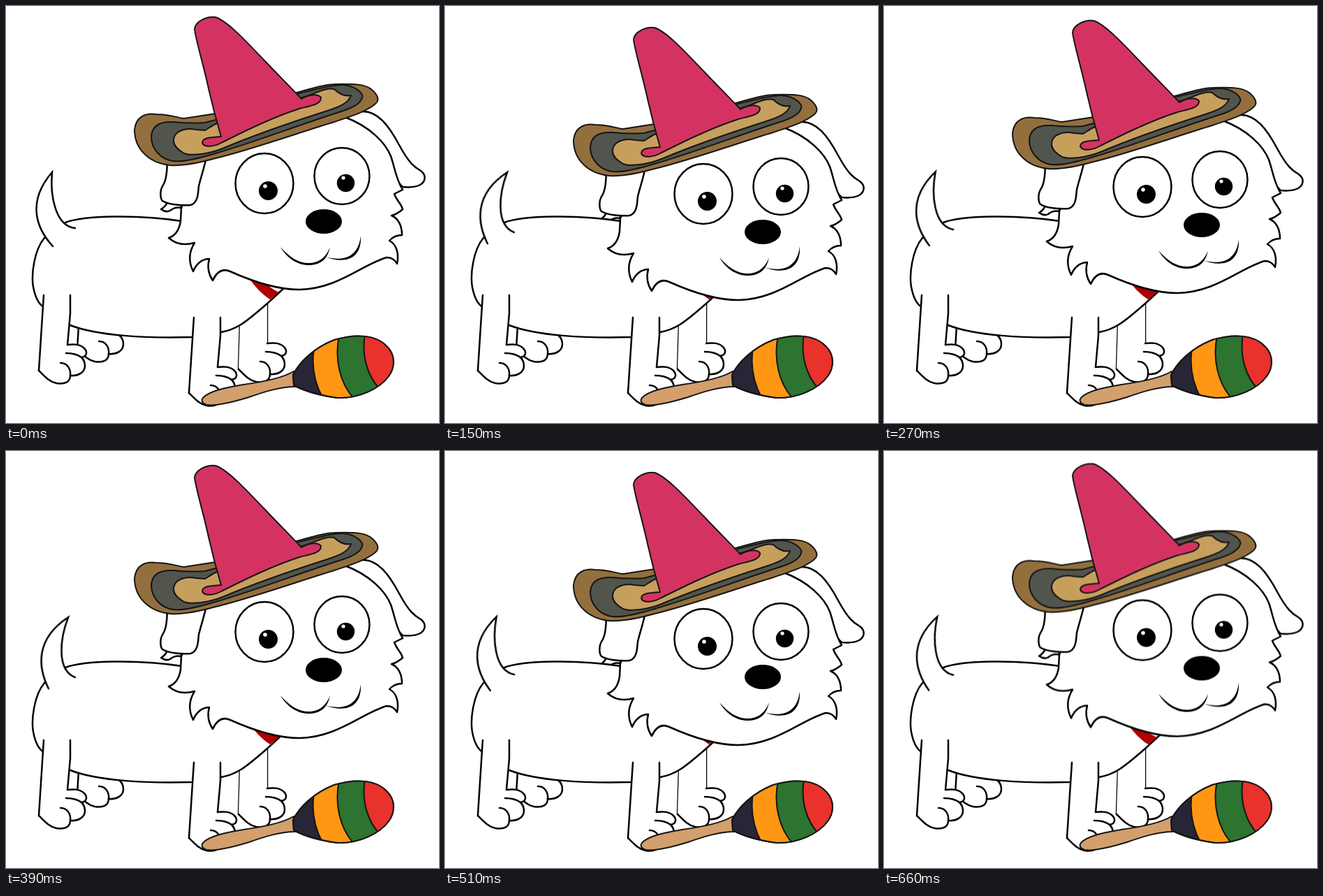
These frames come from a looping animation (620x597 px, 690 ms). An HTML page:

```html
<!DOCTYPE html>
<html lang="en">
<head>
<meta charset="utf-8">
<title>Festive dog</title>
<style>
  html, body { margin: 0; width: 100%; height: 100%; overflow: hidden; background: #fff; }
  svg { display: block; width: 620px; height: 597px; }
  .line { fill: none; stroke: #000; stroke-width: 2.5; stroke-linejoin: round; stroke-linecap: round; }
  .skin { fill: #fff; }
  .prop { stroke: #151515; stroke-width: 2; stroke-linejoin: round; }

  /* 23 poses of 30 ms each */
  .head { animation: bob 690ms infinite; }
  .tail { transform-origin: 77.5px 320.5px; animation: wag 690ms infinite; }

  @keyframes bob {
    0%       { transform: translateY(0);    animation-timing-function: steps(5); }
    21.7391% { transform: translateY(15px); animation-timing-function: steps(6); }
    47.826%  { transform: translateY(0);    animation-timing-function: steps(6); }
    73.913%  { transform: translateY(15px); animation-timing-function: steps(6); }
    100%     { transform: translateY(0); }
  }
  @keyframes wag {
    0%, 34.7826%, 69.5652%  { transform: rotate(0deg);    animation-timing-function: steps(4); }
    17.3913%, 52.1739%      { transform: rotate(21.3deg); animation-timing-function: steps(4); }
    86.9565%                { transform: rotate(21.3deg); animation-timing-function: steps(3); }
    100%                    { transform: rotate(0deg); }
  }
</style>
</head>
<body>
<svg viewBox="0 0 620 597">
  <defs>
    <path id="gourd" d="M411 528C420 510 440 490 470 478C500 469 530 470 546 488C558 500 557 518 548 530C535 548 505 562 475 561C445 557 425 550 412 543Z"/>
    <clipPath id="gourdClip"><use href="#gourd"/></clipPath>
    <g id="foot">
      <path class="skin" d="M47 522C55 530 62 538 72 540C85 542 92 538 92 529C103 530 113 525 113 515Q113 508 108 503C116 502 117 495 112 490C106 484 98 484 88 485"/>
      <path d="M108 503Q100 497 86 497M78 511C88 511 93 520 92 529"/>
    </g>
    <g id="leg">
      <path class="skin" stroke="none" d="M54 414L47 522L88 485L92 440V414Z"/>
      <use href="#foot"/>
      <path d="M54 414C52 445 49 490 47 522M92 414V440L88 485"/>
    </g>
  </defs>

  <!-- tuft behind the ear -->
  <g class="head">
    <path class="line skin" d="M232 279Q229 287 222 291Q229 296 235 293Q242 287 251 289V270Z"/>
  </g>

  <!-- far legs -->
  <g class="line">
    <use href="#foot" x="55" y="-31"/>
    <path d="M104 458L102 491"/>
    <path class="skin" d="M335 455L333 520L374 483V420"/>
    <path class="skin" stroke="none" d="M335 455L333 520L374 483V420Z"/>
    <use href="#foot" x="286" y="-2"/>
    <path class="skin" stroke="none" d="M336 500L335 519L360 505L372 485V470H337Z"/>
  </g>

  <!-- body and collar -->
  <path class="line skin" d="M55 332C40 350 36 385 39 402C42 418 47 427 54 431L92 457C130 472 200 476 268 474L308 467C330 463 342 454 374 426L400 402L300 320L252 308C190 298 110 300 85 310Z"/>
  <path fill="#b00000" d="M347 388C357 403 366 412 378 420L391 410C380 405 373 399 368 390Z"/>

  <!-- near legs -->
  <g class="line">
    <use href="#leg"/>
    <use href="#leg" x="215" y="32"/>
  </g>

  <!-- tail -->
  <path class="line skin tail" style="stroke-linejoin:miter" d="M67 344C45 320 28 282 66 238C63 270 70 315 99 318"/>

  <!-- head -->
  <g class="head">
    <path class="line skin" d="M480 150L510 151C532 150 548 171 563 199C577 225 585 231 594 236C603 243 600 252 593 256C585 260 577 260 568 259L480 165Z"/>
    <path class="line skin" d="M251 289L250 308C248 321 242 329 233 332C243 341 256 343 270 339C262 352 261 366 268 380C272 370 280 362 291 362C288 373 290 384 296 393C302 380 310 375 321 380C350 393 385 406 420 406C475 405 510 370 545 360Q555 360 560 369C563 354 559 341 549 336Q556 328 567 328C567 315 562 304 552 300Q560 298 568 291C566 283 559 278 556 269L568 263C558 247 557 232 551 215C543 195 520 172 485 159L290 190Z"/>
    <path class="line skin" d="M231 212C231 235 230 250 224 258C220 265 221 276 224 279C232 284 250 286 264 285C276 282 275 265 276 258C279 245 283 235 288 212Z"/>

    <g class="line skin">
      <ellipse cx="370" cy="254" rx="41.5" ry="43"/>
      <ellipse cx="481" cy="243.5" rx="39.5" ry="40.5"/>
    </g>
    <circle cx="375.5" cy="264.5" r="13.5"/>
    <circle cx="486.5" cy="253.5" r="12.7"/>
    <circle class="skin" cx="371" cy="258" r="2.8"/>
    <circle class="skin" cx="483" cy="246" r="2.6"/>
    <ellipse cx="455" cy="308.5" rx="26" ry="17.5"/>
    <path d="M393 345C406 360 420 369 436 368C450 367 459 358 464 345C461 361 452 370 436 371C418 372 402 361 393 345Z"/>
    <path d="M457 359C482 366 504 361 508 329C510 365 482 369 457 359Z"/>

    <!-- hat -->
    <g class="prop">
      <path fill="#946f3e" d="M184 177C186 158 200 153 215 155C235 155 245 160 255 161L300 154L416 124C440 118 455 112 470 112C500 111 515 112 524 120C533 128 535 135 529 140C515 152 490 159 470 166C420 181 350 206 300 218C275 225 250 229 235 228C205 225 184 205 184 177Z"/>
      <path fill="#51554d" d="M208 187C209 170 222 165 240 166C258 168 270 168 285 167L300 163L416 126C440 120 465 113 480 113C500 113 513 126 510 131C508 140 495 146 483 150C420 170 350 197 300 211C280 217 255 224 240 222C222 220 208 205 208 187Z"/>
      <path fill="#c79f5d" d="M240 193C240 178 258 174 272 177L285 178C293 173 297 170 302 168L420 132C440 128 455 116 470 119C476 125 484 130 494 128C490 140 475 145 460 150C410 166 350 187 310 204C290 212 265 215 255 211C245 205 240 200 240 193Z"/>
      <path fill="#d43362" d="M270 33C271 22 288 14 300 16C318 22 345 52 370 78C390 99 410 119 423 133C433 127 446 125 451 131C452 141 435 143 420 147C380 160 340 180 310 195C298 202 284 203 281 196C281 188 295 188 308 187C300 160 295 140 290 118C283 85 272 50 270 33Z"/>
    </g>
  </g>

  <!-- maraca -->
  <g class="prop">
    <path fill="#d39f6c" d="M282 561C290 552 310 547 340 542C370 538 395 533 412 523L414 545C392 545 368 553 348 560C325 567 300 573 287 571C281 569 279 565 282 561Z"/>
    <use href="#gourd" fill="#282536"/>
    <g clip-path="url(#gourdClip)">
      <path fill="#ff9715" d="M441 490C437 515 442 540 454 562H570V460H441Z"/>
      <path fill="#2c742f" d="M477 472C470 505 478 540 498 562H570V460H477Z"/>
      <path fill="#e8322b" d="M514 470C509 500 517 530 536 549H570V460H514Z"/>
    </g>
    <use href="#gourd" fill="none"/>
  </g>
</svg>
</body>
</html>
```
